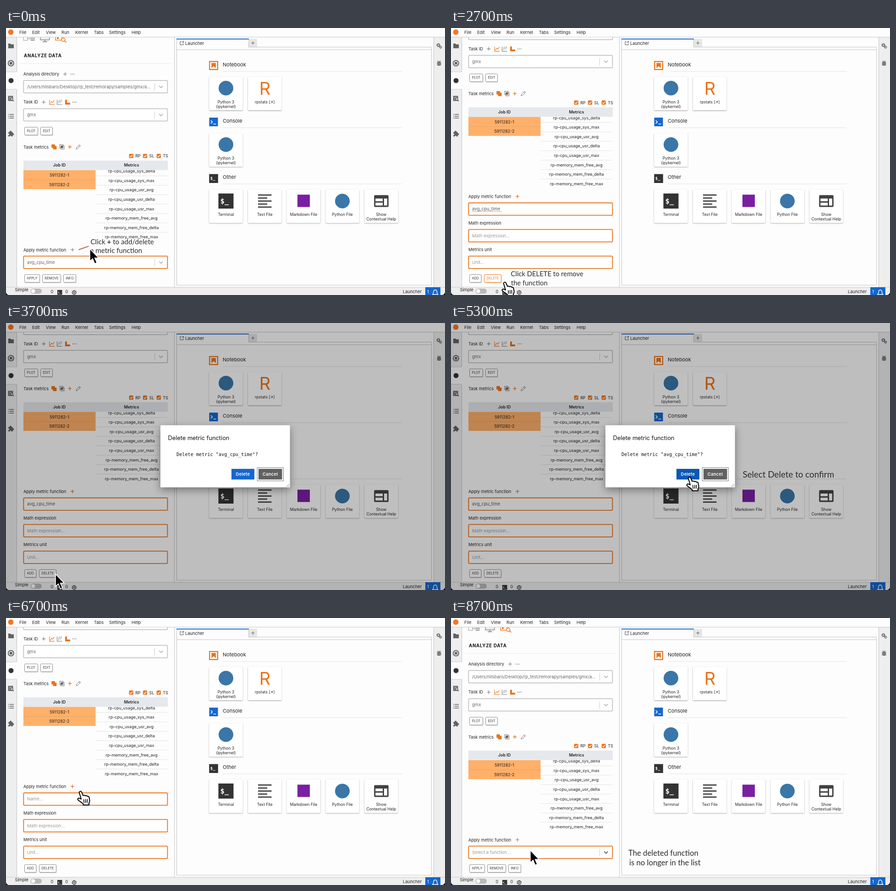
An HTML page for the animation above (8800 ms loop, 958 by 584 pixels).

```html
<!DOCTYPE html>
<html lang="en">
<head>
<meta charset="utf-8">
<title>Delete a metric function</title>
<style>
html, body { margin: 0; width: 100%; height: 100%; overflow: hidden; background: #fefdfe; }
svg { display: block; width: 958px; height: 584px; }
text { font-family: Inter, sans-serif; white-space: pre; }
.cap { font-family: Lato, sans-serif; }
.mono { font-family: "DejaVu Sans Mono", monospace; }
</style>
</head>
<body>
<svg id="stage" viewBox="0 0 958 584" xmlns="http://www.w3.org/2000/svg"></svg>
<script>
const LOOP = 8800, SCROLL = -116.6;
const ORANGE = '#e8741c', GREY = '#616161', DARK = '#333', BLUE = '#1567cf';

// y is the vertical middle of the capitals
const text = (x, y, s, size = 9.2, fill = '#222', extra = '') =>
  `<text x="${x}" y="${y + size * .36}" font-size="${size}" fill="${fill}" ${extra}>${s}</text>`;
const mid = (x, y, s, size, fill, extra = '') => text(x, y, s, size, fill, 'text-anchor="middle" ' + extra);
const cap = (x, y, s, size) => text(x, y, s, size, '#2b2b2b', 'class="cap"');
const rect = (x, y, w, h, fill, extra = '') =>
  `<rect x="${x}" y="${y}" width="${w}" height="${h}" fill="${fill}" ${extra}/>`;
const line = (d, stroke, w = 1, extra = '') =>
  `<path d="${d}" fill="none" stroke="${stroke}" stroke-width="${w}" ${extra}/>`;
const shape = (d, fill, extra = '') => `<path d="${d}" fill="${fill}" ${extra}/>`;
const dot = (x, y, r, fill, extra = '') => `<circle cx="${x}" cy="${y}" r="${r}" fill="${fill}" ${extra}/>`;
const group = (id, body, extra = '') => `<g id="${id}" ${extra}>${body}</g>`;
const plus = (x, y, c = '#777', w = 1.1, r = 4) => line(`M${x - r} ${y}h${2 * r}M${x} ${y - r}v${2 * r}`, c, w);
const dots = (x, y) => [-3.4, 0, 3.4].map(d => dot(x + d, y, .9, '#666')).join('');
const chevron = (x, y, c, id = '') => line(`M${x - 4} ${y - 2}l4 4l4 -4`, c, 1.7, id);

function field(y, orange) {
  return rect(38.4, y, 314, 27.2, '#fff', `rx="2" stroke="${orange ? ORANGE : '#b9b9b9'}" stroke-width="${orange ? 1.8 : 1.5}"`);
}
function select(y, s, orange, id = '') {
  return field(y, orange) + text(46, y + 13.6, s, 9.5, '#666', id && `id="${id}"`) +
    line(`M324.5 ${y + 6}v16`, '#ccc') + chevron(338.3, y + 13.8, '#b5b5b5', id && `id="${id}Arrow"`);
}
function button(x, w, y, s, id = '') {
  return `<g ${id && `id="${id}"`} stroke="#8d8d8d">` +
    shape(`M${x + 1} ${y + 17.8}h${w - 1}v-16`, 'none', 'stroke-opacity=".55" stroke-width="1.3"') +
    rect(x, y, w, 17, '#fff', 'rx="2" stroke-width="1"') +
    mid(x + w / 2, y + 8.5, s, 7.2, '#333', 'stroke="none"') + '</g>';
}
function check(x, s) {
  return rect(x - 4.6, 275.2, 9.2, 9.2, ORANGE, 'rx="1.5"') +
    line(`M${x - 2.6} 280l2 2l3.6 -4.3`, '#fff', 1.4) + text(x + 9, 280, s, 8.8);
}
function gear(x, y, r, c) {
  return dot(x, y, r, 'none', `stroke="${c}" stroke-width="${r * .62}"`) +
    dot(x, y, r * 1.45, 'none', `stroke="${c}" stroke-width="${r * .5}" stroke-dasharray="${r * .57}"`);
}
const prompt = (x, y, size, s, fill) =>
  rect(x, y, size, size, fill) + text(x + size * .13, y + size * .5, s, size * .46, '#fff', 'class="mono" font-weight="700"');

function frame() {
  const side = [
    shape('M5 34h4.5l1.5 1.8h6v8.4h-12z', GREY),
    dot(10.8, 77, 6, 'none', `stroke="${GREY}" stroke-width="2"`) + rect(8, 74.2, 5.6, 5.6, GREY),
    rect(0, 96, 24, 38, '#fefdfe') + line('M0 96h23.5M0 134h23.5', '#ccc') + dot(11, 115, 5.5, DARK),
    rect(4.8, 148.5, 10.5, 11, GREY) + line('M7 151.5h6M7 154h3M7 156.5h2', '#eee') +
      dot(12.6, 155.6, 2.4, '#eee', `stroke="${GREY}" stroke-width="1.3"`) + line('M14.3 157.5l2.6 2.6', GREY, 1.5),
    line('M8 189h9M8 193h9M8 197h9M5 189h1.6M5 193h1.6M5 197h1.6', GREY, 1.6),
    rect(5, 227.5, 9.8, 9.8, GREY, 'rx="1"') + dot(10, 227, 2.3, GREY) + dot(15, 232.3, 2.3, GREY) +
      dot(5.4, 232.5, 1.8, '#eee') + dot(10, 237.3, 1.8, '#eee')
  ].join('');
  const menu = [[29, 'File'], [57, 'Edit'], [87, 'View'], [121, 'Run'], [151, 'Kernel'], [192, 'Tabs'], [225, 'Settings'], [274, 'Help']]
    .map(([x, s]) => text(x, 9.8, s, 9.3)).join('');
  return rect(0, 20, 23.5, 547, '#eee') + line('M23.5 20V567', '#c4c4c4') + side +
    rect(933, 20, 25, 547, '#eee') + line('M933.5 20V567', '#c4c4c4') +
    gear(943.5, 37.5, 2.5, GREY) + gear(948.3, 42, 1.9, GREY) +
    `<ellipse cx="945" cy="78" rx="3.4" ry="4.6" fill="${GREY}"/>` +
    line('M940 75h10M940 78h10M940 81h10M942 71.5l2 2M948 71.5l-2 2', GREY, 1.2) + line('M943.6 77h2.8M943.6 79.5h2.8', '#eee', .9) +
    rect(0, 0, 958, 20, '#fefdfe') + line('M0 20H958', '#c4c4c4') + dot(10.5, 9, 6, '#f37726') + menu +
    rect(0, 567, 958, 17, '#eee') + line('M0 567H958', '#c9c9c9') +
    text(19.5, 573, 'Simple', 9.2) +
    rect(53.5, 570, 24.5, 11, '#b9b9b9', 'rx="5.5"') + dot(59.3, 575.5, 4.8, '#fff', 'stroke="#999" stroke-width=".6"') +
    text(97.5, 577, '0', 9.2) + prompt(112, 573, 10.5, '$_', DARK) + text(129.5, 577, '0', 9.2) +
    dot(148.7, 578.5, 3.5, 'none', 'stroke="#444" stroke-width="1.3"') + dot(148.7, 578.5, 1.4, '#444') +
    dot(148.7, 578.5, 4.7, 'none', 'stroke="#444" stroke-width="1.2" stroke-dasharray="1.8 1.89"') +
    text(866, 577, 'Launcher', 9.3) + rect(915, 567, 33, 17, BLUE) + text(919, 577, '1', 9.3, '#fff') +
    line('M931 583q2 -2 2 -6q.5 -4 3.7 -4t3.7 4q0 4 2 6z', '#fff', 1.3);
}

function launcher() {
  const section = (y, s) => text(473, y, s, 11) + line(`M473 ${y + 15}H863.5`, '#e2e2e2');
  const card = (col, y, ...rows) => {
    const x = 443.4 + col * 84.75;
    return rect(x, y, 73, 73, '#fff', 'rx="1" filter="url(#lift)"') +
      rows.map((s, i) => mid(x + 36.5, y + 55 + i * 10, s, 8.6)).join('');
  };
  const row = (n, y) => line(`M550 ${y}h${n}`, '#444', 2.8);
  return line('M372.5 42V562.5H928.5V42', '#c4c4c4') +
    rect(530, 24, 18, 18, '#e6e6e6') + line('M530 41.8H929M372.5 47.5H929', '#c4c4c4') +
    rect(372.5, 24, 157, 23, '#fefdfe') + line('M372.5 24V47.5H929M529.5 24V42', '#c4c4c4') +
    rect(372, 23.2, 158, 1.9, BLUE) +
    line('M383 29.8h-3v7h7v-3M384 33.2l3.2 -3.4M384.8 29.5h2.6v2.6', '#555', 1) +
    text(391, 33.2, 'Launcher', 9.3) + plus(538.8, 32.8, '#666', 1.1, 3.6) +
    section(80, 'Notebook') + section(203, 'Console') + section(326, 'Other') +
    rect(444.3, 73.3, 17.6, 17.6, '#fff', `stroke="${ORANGE}" stroke-width="2.3"`) + shape('M448.3 76.5h9.6v11.3l-4.8 -4.4l-4.8 4.4z', ORANGE) +
    rect(443.5, 196, 19, 19, BLUE) + line('M446.8 202l3.6 3.4l-3.6 3.4M452.5 210h6', '#fff', 1.6) +
    prompt(443.3, 319.5, 19.5, '$_', DARK) +
    card(0, 107, 'Python 3', '(ipykernel)') + card(1, 107, 'rpstats [↗]') + card(0, 230.3, 'Python 3', '(ipykernel)') +
    card(0, 353.3, 'Terminal') + card(1, 353.3, 'Text File') + card(2, 353.3, 'Markdown File') +
    card(3, 353.3, 'Python File') + card(4, 353.3, 'Show', 'Contextual Help') +
    dot(480, 131.5, 16, '#3a76a8') + dot(480, 255, 16, '#3a76a8') + dot(734, 378.5, 16, '#3a76a8') +
    mid(565, 132.3, 'R', 38, ORANGE) +
    prompt(463.5, 362, 33, '$_', DARK) +
    row(29.5, 365.3) + row(20, 371.9) + row(29.5, 378.5) + row(20, 385.1) + row(29.5, 391.7) +
    rect(636, 364.5, 27, 27, '#7b1fa2') +
    rect(803.3, 365.5, 31.5, 26, '#424242', 'rx="2.5"') + rect(806.3, 373, 15.8, 6, '#fff') + rect(806.3, 382, 15.8, 6.3, '#fff') + rect(825, 373, 6.8, 15.3, '#fff');
}

function panelTop() {
  const metrics = ['cpu_usage_sys_delta', 'cpu_usage_sys_max', 'cpu_usage_usr_avg', 'cpu_usage_usr_delta', 'cpu_usage_usr_max',
    'memory_mem_free_avg', 'memory_mem_free_delta', 'memory_mem_free_max'];
  const rows = metrics.map((s, i) => {
    const y = 313 + i * 20.6;
    return mid(274, y, 'rp-' + s, 9) + (i < 7 ? line(`M196 ${y + 10.3}H352.5`, '#e3e3e3') : '');
  }).join('');
  const axes = (x, c) => line(`M${x - 5} 157v10.5h11`, c, 1.1);
  return rect(38, 18, 9, 9, 'none', 'stroke="#999"') + line('M46 23h6m-2 -2l2 2l-2 2', '#999') +
    rect(53, 17, 10, 11, '#aaa', 'rx="3"') + line('M53 21h10M53 24.5h10', '#fff') +
    rect(75, 14, 20, 12, '#eee', 'stroke="#777" stroke-width="1.2"') + line('M85 26v3.5M80 30h10', '#777', 1.4) +
    rect(108, 14, 14, 12.5, '#fff', `stroke="${ORANGE}" stroke-width="1.4"`) + rect(111, 19, 4, 5, ORANGE) +
    dot(125, 25.5, 3.8, '#fff', `stroke="${ORANGE}" stroke-width="1.4"`) + line('M128 28.4l3.4 3', ORANGE, 1.7) +
    text(39, 61, 'ANALYZE DATA', 9.7, '#111', 'font-weight="700" letter-spacing=".72"') + line('M31 77.5H360', '#ececec') +
    text(38, 101, 'Analysis directory') + plus(129, 100.8) + dots(145, 100.8) +
    select(114.8, '/Users/nilsbaro/Desktop/rp_test/remorapy/samples/gmx/a...') +
    text(38, 162, 'Task ID') + plus(82.3, 162.2) +
    axes(100, ORANGE) + line('M96.5 165l3 -4l2.5 2l3.5 -5', ORANGE, 1.2) +
    axes(116.5, '#888') + line('M113 165l3 -4l2.5 2l3.5 -4.5M113.5 161l3 -3l2 1.5l3 -3', '#888', 1) +
    shape('M129 157h4v6.5h7v4h-11z', ORANGE) + dots(149.5, 162.2) +
    select(176.4, 'gmx') + button(40.5, 29, 217, 'PLOT') + button(75.5, 26, 217, 'EDIT') +
    text(38, 260.2, 'Task metrics') + rect(99.3, 254.6, 7.6, 7.6, ORANGE, 'rx="1"') + rect(102.6, 257.8, 7.8, 7.8, ORANGE, 'rx="1"') +
    rect(117, 255, 7.4, 7.4, 'none', 'stroke="#777"') + rect(119.5, 257.6, 7.4, 7.4, 'none', 'stroke="#777"') + rect(119.8, 258, 4.4, 4.2, '#666') +
    plus(139.3, 260, ORANGE, 1.4) + line('M153 265l.8 -3.2l6.6 -6.6l2.3 2.3l-6.6 6.6zM159 256.6l2.3 2.3', '#777') +
    check(273.2, 'RP') + check(303.5, 'SL') + check(333.3, 'TS') +
    `<g clip-path="url(#list)">${rows}</g>` +
    rect(38, 290, 315, 20.6, '#e5e8ec') + mid(116.5, 300.2, 'Job ID', 9, '#222', 'font-weight="600"') + mid(274, 300.2, 'Metrics', 9, '#222', 'font-weight="600"') +
    rect(38, 311, 157.5, 41.6, '#ffb069') + line('M38 332H195.5', '#e9a566') +
    mid(116.5, 322, '5911282-1', 9) + mid(116.5, 342.5, '5911282-2', 9) +
    text(38, 485.3, 'Apply metric function') + group('addIcon', plus(145, 485));
}

const listForm = () => select(498.9, '', true, 'pick') + button(40.5, 33, 539.3, 'APPLY') + button(79.5, 40, 539.3, 'REMOVE') + button(125.5, 27, 539.3, 'INFO');
const newForm = () => field(382.5, true) + text(46, 396, '', 9.6, '#555', 'id="name"') +
  line('M46 401.3H111', '#e0564a', 1.2, 'id="spell" stroke-dasharray="1.5 1.5"') +
  text(38, 427, 'Math expression') + field(440.7, true) + text(46, 454.5, 'Math expression...', 9.5, '#999') +
  text(38, 485, 'Metrics unit') + field(498.9, true) + text(46, 512.5, 'Unit...', 9.5, '#999') +
  button(40.5, 25.5, 539.3, 'ADD') + button(72.5, 37, 539.3, 'DELETE', 'remove');

const dialog = () => rect(0, 0, 958, 584, '#000', 'opacity=".25"') +
  rect(337, 223.8, 282.5, 135.5, '#fff', 'rx="1" filter="url(#deep)"') +
  text(353.5, 251.3, 'Delete metric function', 12.8, '#111') +
  text(372, 287, 'Delete metric "avg_cpu_time"?', 10.2, '#111', 'class="mono"') +
  rect(492, 319, 50, 23.3, BLUE, 'id="confirm"') + mid(517, 330.8, 'Delete', 9.5, '#fff', 'font-weight="600" letter-spacing=".25"') +
  rect(548.3, 316.3, 57, 29, '#fff', 'stroke="#777"') + rect(551, 319, 51.5, 23.3, '#616161') +
  mid(576.5, 330.8, 'Cancel', 9.5, '#fff', 'font-weight="600" letter-spacing=".25"') +
  line('M612 358l6 -6M615.5 358l2.5 -2.5', '#777', .9);

const pointer = () => shape('M0 0V27L6.1 21.6L10.6 32.4L15.2 30.4L10.7 20H19Z', '#000', 'stroke="#fff" stroke-width="1.6"');
const hand = () => `<g transform="translate(-7 -1)">` +
  shape('M5 4.5C4.2 1 8.6 -.4 10 2.8L13.2 10.2C14.8 9 17 9.6 17.6 11C19.4 9.8 21.6 10.4 22.2 12C24.4 11.4 26 12.6 26.6 15L27.6 20.5Q28 24 26 27V31H13.5V28.5Q9 24.5 3 20.8C.4 18.6 1.8 15.4 5 16.2L9 18Z',
    '#fff', 'stroke="#000" stroke-width="2" stroke-linejoin="round"') +
  line('M14.6 18.5l.9 8M18.6 18.3l.5 8M22.4 18l.2 8', '#000', 1.6) + '</g>';

document.getElementById('stage').innerHTML =
  `<defs>
    <clipPath id="panel"><rect x="24" y="20.5" width="343" height="546.5"/></clipPath>
    <clipPath id="list"><rect x="190" y="310.6" width="170" height="152"/></clipPath>
    <filter id="lift" x="-20%" y="-20%" width="140%" height="140%"><feDropShadow dx="0" dy="1" stdDeviation="1.1" flood-opacity=".42"/></filter>
    <filter id="deep" x="-20%" y="-30%" width="140%" height="170%"><feDropShadow dx="0" dy="6" stdDeviation="9" flood-opacity=".4"/></filter>
  </defs>` +
  rect(0, 0, 958, 584, '#fefdfe') + frame() + launcher() + line('M367.5 20V567', '#c4c4c4') +
  `<g clip-path="url(#panel)">${group('scroll', panelTop())}${group('listForm', listForm())}${group('newForm', newForm())}</g>` +
  group('dialog', dialog()) +
  group('cap0', cap(184.5, 467.5, 'Click <tspan font-weight="700">+</tspan> to add/delete', 15.1) + cap(184, 487, 'a metric function', 15.1) +
    line('M158.5 485L180.5 477.2', '#c4695c', 2)) +
  group('cap1', cap(130.5, 537.5, 'Click DELETE to remove', 14.8) + cap(131, 558, 'the function', 14.8)) +
  group('cap2', cap(636.5, 331, 'Select Delete to confirm', 18.8)) +
  group('cap3', cap(387, 513.5, 'The deleted function', 16.7) + cap(389, 535, 'is no longer in the list', 16.7)) +
  shape('M0 578V584H6Q1 583 0 578ZM958 578V584H952Q957 583 958 578Z', '#000') +
  group('pointer', pointer()) + group('hand', hand());

const $ = Object.fromEntries([...document.querySelectorAll('#stage [id]')].map(e => [e.id, e]));
const show = (id, on) => $[id].setAttribute('visibility', on ? 'visible' : 'hidden');
const set = (id, key, value) => $[id].setAttribute(key, value);
const within = (t, a, b) => t >= a && t < b;

// time, x, y of the cursor's hot spot
const path = [[0, 183, 483], [300, 183, 483], [800, 149, 486], [1200, 149, 486], [1400, 153, 487], [1700, 150, 398], [2100, 150, 398],
  [2600, 117, 556], [3000, 117, 556], [3500, 108, 549], [4000, 108, 549], [4900, 520, 337], [5500, 520, 337], [6600, 162, 379],
  [7000, 162, 379], [7900, 173, 508], [LOOP, 173, 508]];
function place(t) {
  const i = path.findIndex(p => p[0] > t), [t0, x0, y0] = path[i - 1], [t1, x1, y1] = path[i];
  const u = (t - t0) / (t1 - t0), e = u * u * (3 - 2 * u);
  return [x0 + (x1 - x0) * e, y0 + (y1 - y0) * e];
}

function draw(now) {
  const t = Math.floor(now % LOOP / 100) * 100;
  const form = within(t, 1300, 7000), modal = within(t, 3700, 5400);
  set('scroll', 'transform', `translate(0 ${form ? SCROLL : 0})`);
  show('newForm', form);
  show('listForm', !form);
  show('dialog', modal);
  set('addIcon', 'style', form ? 'filter:none' : '');
  const mark = $.addIcon.firstChild;
  mark.setAttribute('stroke', form ? ORANGE : '#777');
  mark.setAttribute('stroke-width', form ? 1.4 : 1.1);

  const typed = t < 5400 ? 'avg_cpu_time'.slice(0, Math.max(0, Math.floor((t - 1700) / 50))) : '';
  $.name.textContent = typed || 'Name...';
  set('name', 'fill', typed ? '#555' : '#999');
  show('spell', within(t, 2300, 3700));
  const hover = within(t, 2500, 3700);
  set('remove', 'stroke', hover ? ORANGE : '#8d8d8d');
  $.remove.querySelector('text').setAttribute('fill', hover ? ORANGE : '#333');

  const late = t >= 7000;
  $.pick.textContent = late ? 'Select a function ...' : 'avg_cpu_time';
  set('pick', 'fill', late ? '#999' : '#666');
  set('pickArrow', 'stroke', t >= 7900 ? '#555' : '#b5b5b5');
  set('confirm', 'fill', t >= 4800 ? '#0d57b5' : BLUE);

  show('cap0', t < 1300);
  show('cap1', within(t, 2400, 3700));
  show('cap2', within(t, 4200, 5400));
  show('cap3', t >= 7700);

  const pointing = [[700, 1300], [2500, 3700], [4800, 5500], [6500, 7100]].some(([a, b]) => within(t, a, b));
  const at = `translate(${place(t).join(' ')})`;
  set('pointer', 'transform', at);
  set('hand', 'transform', at);
  show('pointer', !pointing);
  show('hand', pointing);
}

const start = performance.now();
function tick() {
  draw(performance.now() - start);
  requestAnimationFrame(tick);
}
tick();
</script>
</body>
</html>
```
